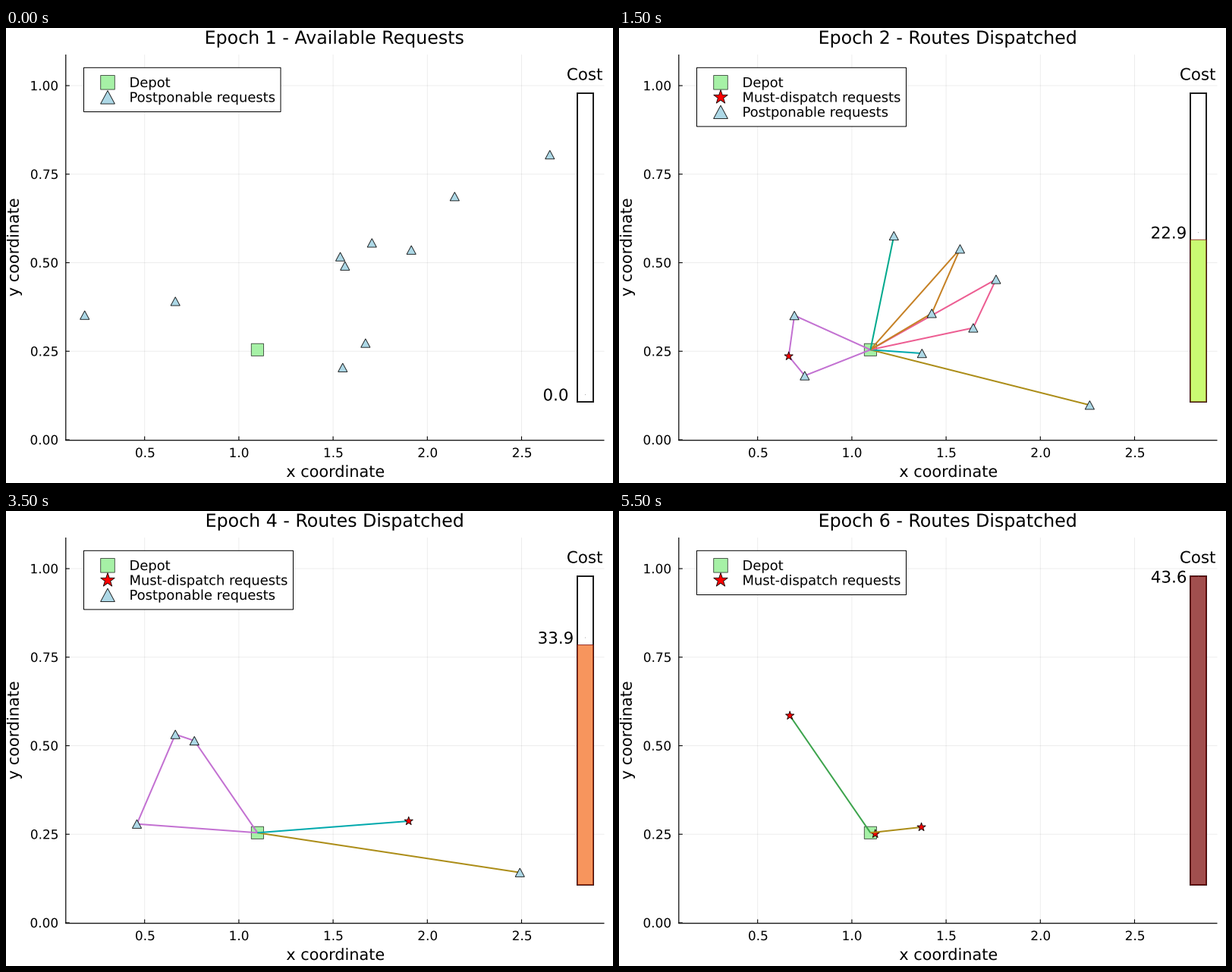
Recreate the animation shown at these times as a matplotlib script. Size 800 by 600 pixels, loop 6 s.

```python
from itertools import cycle

import numpy as np
import matplotlib.pyplot as plt
from matplotlib.animation import FuncAnimation
from matplotlib.patches import PathPatch, Polygon, Rectangle
from matplotlib.textpath import TextPath
from matplotlib.transforms import Affine2D

plt.rcParams["font.family"] = "DejaVu Sans"
plt.rcParams["path.snap"] = False

PT = 0.72  # points per pixel at 100 dpi
GREEN, BLUE, RED = (0.651, 0.945, 0.651), "#add8e6", "#ff0000"
ROUTE_COLORS = ["#3da44d", "#c371d2", "#ac8d18", "#00a9ad",
                "#ed5d92", "#c68125", "#00a98d", "#8e971d"]
BAR_X, BAR_TOP, BAR_BOTTOM, BAR_W = 753, 86, 493, 21

# Positions are complex numbers x + yj in plot units.
DEPOT = 1.0986 + 0.2542j
NEAR, MID, SOUTH, FAR = 1.124 + 0.251j, 1.619 + 0.365j, 1.672 + 0.273j, 2.65 + 0.805j

# Per epoch: must-dispatch requests, postponable requests.
EPOCHS = [
    ([], [0.182 + 0.352j, 0.663 + 0.391j, 1.551 + 0.204j, SOUTH, 1.563 + 0.491j,
          1.538 + 0.517j, 1.706 + 0.556j, 1.915 + 0.536j, 2.145 + 0.687j, FAR]),
    ([0.665 + 0.236j],
     [0.695 + 0.351j, 0.75 + 0.181j, 1.223 + 0.576j, 1.574 + 0.539j, 1.424 + 0.357j,
      1.765 + 0.453j, 1.372 + 0.244j, 1.644 + 0.316j, 2.262 + 0.098j]),
    ([MID, 1.0 + 0.221j],
     [0.353 + 0.349j, 0.694 + 0.312j, 1.263 + 0.255j, 1.351 + 0.315j, SOUTH,
      1.532 + 0.251j]),
    ([1.901 + 0.287j],
     [0.459 + 0.279j, 0.663 + 0.532j, 0.764 + 0.514j, 2.491 + 0.142j]),
    ([NEAR, MID, FAR, 2.221 + 0.27j, 2.118 + 0.521j], []),
    ([NEAR, 0.671 + 0.585j, 1.369 + 0.27j], []),
]
COSTS = [0.0, 13.5, 22.9, 27.3, 33.9, 40.3, 43.6]

fig = plt.figure(figsize=(8, 6), dpi=100, facecolor="white")
ax = fig.add_axes([0, 0, 1, 1])
ax.set(xlim=(0, 800), ylim=(600, 0))
ax.axis("off")


def pixel(p):
    return 58.5 + 248.4 * p.real, 543 - 467 * p.imag


def text(x, y, s, size, align=0.5, angle=0):
    """Place outlined text by its inked width: align 0 left, 0.5 middle, 1 right."""
    path = TextPath((0, 0), s, size=size)
    ink = path.get_extents()
    place = (Affine2D().translate(-ink.x0 - align * ink.width, 0)
             .rotate_deg(angle).scale(1, -1).translate(x, y))
    return ax.add_patch(PathPatch(place.transform_path(path), fc="black", lw=0, zorder=8))


def line(xs, ys, color="black", width=1.0, z=1, **kw):
    return ax.plot(xs, ys, color=color, lw=width * PT, zorder=z,
                   solid_capstyle="butt", solid_joinstyle="round", **kw)[0]


def polygon(points, fill, z):
    return ax.add_patch(Polygon(points, closed=True, fc=fill, ec=(0, 0, 0, 0.9),
                                lw=0.9 * PT, zorder=z, joinstyle="miter"))


def box(x, y, w, h, fill, edge, width, z):
    return ax.add_patch(Rectangle((x, y), w, h, fc=fill, ec=edge, lw=width * PT,
                                  zorder=z, joinstyle="miter"))


def square(x, y, half, z=3):
    return box(x - half, y - half, 2 * half, 2 * half, GREEN, (0, 0, 0, 0.7), 0.9, z)


def triangle(x, y, half, z=5):
    h = 0.93 * half
    return polygon([(x, y - h), (x + half, y + h), (x - half, y + h)], BLUE, z)


def star(x, y, r, z=5):
    corner = np.arange(10)
    radius = np.where(corner % 2, 0.39 * r, r)
    angle = corner * np.pi / 5
    return polygon(np.c_[x + radius * np.sin(angle), y - radius * np.cos(angle)], RED, z)


def draw_axes():
    for i in range(5):
        x, y = 182.7 + 124.2 * i, 543 - 116.75 * i
        line([x, x], [35, 543.5], width=0.9, alpha=0.08)
        line([78.8, 788.5], [y, y], width=0.9, alpha=0.08)
        line([x, x], [543.5, 538.5], width=1.1, z=2)
        line([78.8, 83.8], [y, y], width=1.1, z=2)
        text(x + 0.5, 566, f"{0.5 + 0.5 * i:.1f}", 16.9)
        text(68, y + 6.2, f"{0.25 * i:.2f}", 16.9, align=1)
    line([78.8, 78.8], [35, 544], width=1.2, z=2)
    line([78.3, 788.5], [543.7, 543.7], width=1.2, z=2)
    text(434, 592, "x coordinate", 20.8)
    text(16.7, 289.5, "y coordinate", 20.8, angle=90)
    text(763, 68.5, "Cost", 21.4)
    box(BAR_X, BAR_TOP, BAR_W, BAR_BOTTOM - BAR_TOP, "white", "#1c1c1c", 2, 3)
    square(*pixel(DEPOT), 8.1)


def draw_legend(must, postponable):
    entries = [("Depot", square, 9.3)]
    if must:
        entries.append(("Must-dispatch requests", star, 9.8))
    if postponable:
        entries.append(("Postponable requests", triangle, 9.4))
    width = 276 if must else 259.5
    arts = [box(102.5, 52.3, width, 19.4 * (len(entries) + 1), "white", "black", 1, 6)]
    for i, (label, marker, size) in enumerate(entries):
        y = 71.8 + 19.5 * i
        arts += [marker(134, y, size, z=7), text(164.3, y + 6.2, label, 17.9, align=0)]
    return arts


def draw_cost(cost):
    share = cost / COSTS[-1]
    top = BAR_BOTTOM - (BAR_BOTTOM - BAR_TOP) * share
    label_y = max(top - 9.5, BAR_TOP + 0.7)
    arts = [text(724.5, label_y + 7.8, f"{cost:.1f}", 21.4),
            box(763.2, label_y - 0.4, 0.8, 0.8, "#777777", "none", 0, 6)]
    if cost:
        arts.append(box(BAR_X, top, BAR_W, BAR_BOTTOM - top, plt.cm.turbo(share, alpha=0.7),
                        (0.48, 0.02, 0.02, 0.7), 1.1, 4))
    return arts


def plan_routes(stops):
    """Sweep anticlockwise from north, chaining stops that lie close together."""
    routes = []
    for stop in sorted(stops, key=lambda p: np.angle((p - DEPOT) / 1j) % (2 * np.pi)):
        last = routes[-1][-1] if routes else DEPOT
        if abs(stop - last) < 0.7 * min(abs(stop - DEPOT), abs(last - DEPOT)):
            routes[-1].append(stop)
        else:
            routes.append([stop])
    return routes


def draw_route(route, color):
    # A single stop needs no return leg: it would retrace the same line.
    path = [DEPOT, *route] + [DEPOT] * (len(route) > 1)
    return line(*zip(*map(pixel, path)), color=color, width=2, z=5)


artists = []


def update(frame):
    while artists:
        artists.pop().remove()
    epoch, dispatched = divmod(frame, 2)
    must, postponable = EPOCHS[epoch]
    stage = "Routes Dispatched" if dispatched else "Available Requests"

    artists.append(text(433.3, 20.8, f"Epoch {epoch + 1} - {stage}", 23.7))
    artists.extend(draw_legend(must, postponable))
    artists.extend(draw_cost(COSTS[epoch + dispatched]))
    skip = bool(must and postponable)
    for color, route in zip(cycle(ROUTE_COLORS[skip:]), plan_routes(must + postponable)):
        if dispatched:
            artists.append(draw_route(route, color))
        for stop in route:
            x, y = pixel(stop)
            artists.append(star(x, y, 6) if stop in must else triangle(x, y, 6.1))
    return artists


draw_axes()
anim = FuncAnimation(fig, update, frames=2 * len(EPOCHS), interval=500, repeat=True,
                     repeat_delay=0, init_func=lambda: update(0), blit=False)
plt.show()
```
